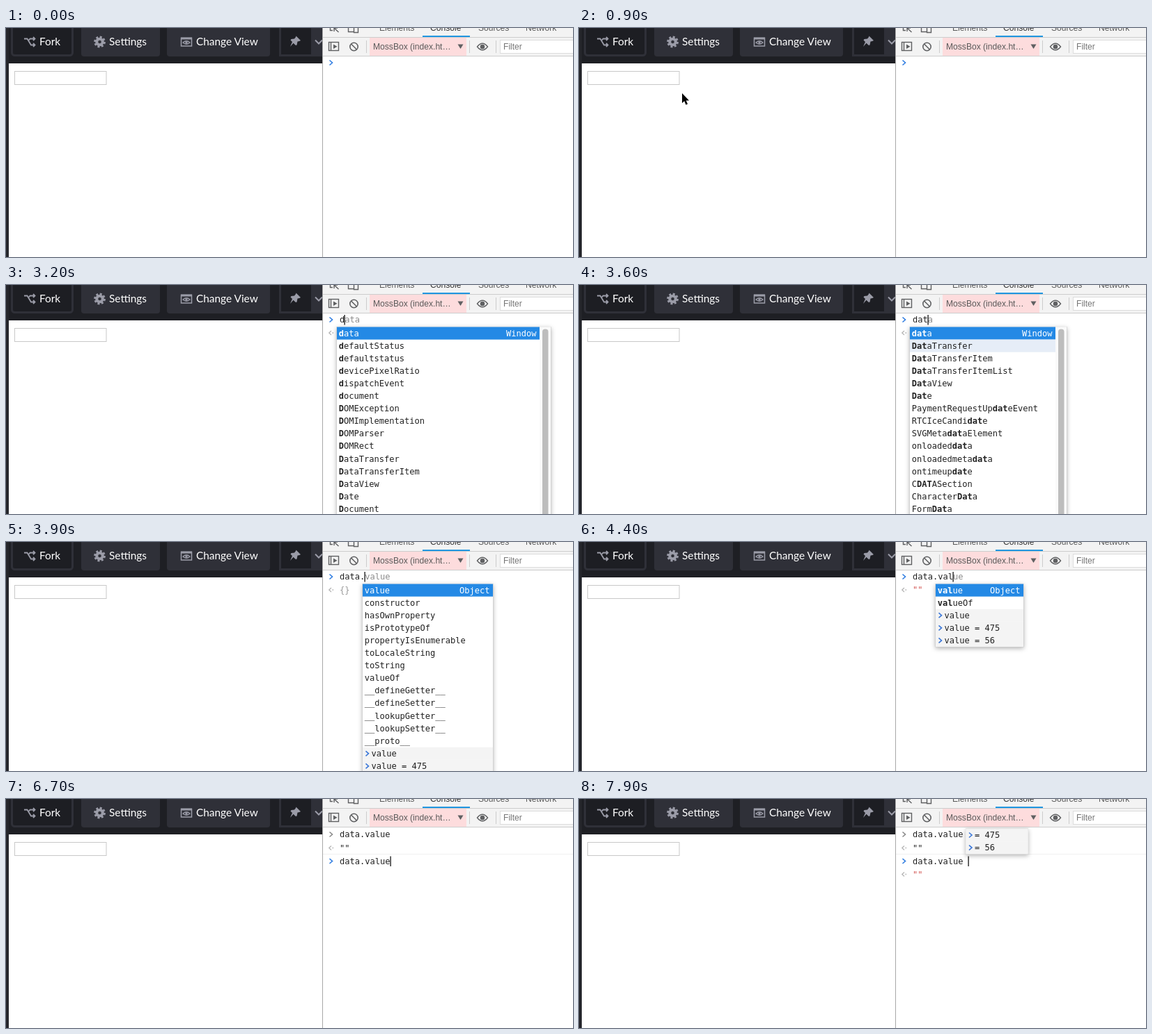
Animation, 814 px wide and 330 px high, one loop 8 s. Source, as an HTML page:

```html
<!DOCTYPE html>
<html lang="en">
<head>
<meta charset="utf-8">
<title>Console session</title>
<style>
  html, body { margin: 0; width: 100%; height: 100%; overflow: hidden; background: #fff; }
  svg { display: block; width: 814px; height: 330px; }
  text { white-space: pre; }
  .nav { font: 15.4px Lato, sans-serif; fill: #fff; }
  .ui { font: 12.1px "Liberation Sans", Arial, sans-serif; fill: #5a5a5a; }
  .mono { font: 12.05px "DejaVu Sans Mono", Menlo, monospace; fill: #222; }
  .bold { font-weight: bold; }
  .line { fill: none; stroke: #5f6062; stroke-width: 1.4; }
  .icon { fill: none; stroke: #9b9ca8; stroke-width: 1.8; }
  .popup { filter: drop-shadow(0 2px 3px rgba(0, 0, 0, .3)); }
</style>
</head>
<body>
<svg viewBox="0 0 814 330">
  <rect width="814" height="330" fill="#fff"/>

  <!-- editor header -->
  <rect width="454" height="51" fill="#1e1f24"/>
  <rect width="4" height="330" fill="#25262b"/>
  <rect x="8.5" y="-8" width="87" height="47.500" rx="4" fill="#1d1e23" stroke="#2f3038" stroke-width="3"/>
  <rect x="108" y="-8" width="113" height="49" rx="4" fill="#2f3038"/>
  <rect x="231" y="-8" width="148" height="49" rx="4" fill="#2f3038"/>
  <path d="M454 -8H393.500V39.500H454" fill="#1d1e23" stroke="#2f3038" stroke-width="3"/>
  <rect x="438" y="0" width="16" height="41" fill="#2f3038"/>
  <text class="nav" x="48" y="25">Fork</text>
  <text class="nav" x="148" y="25">Settings</text>
  <text class="nav" x="273" y="25">Change View</text>
  <g class="icon">
    <path d="M26 15.500H30.500L36 24.500H41M33 17.500L34.500 15.500H41M39 13L41.500 15.500 39 18M39 22L41.500 24.500 39 27"/>
    <circle cx="134.500" cy="20" r="4.300" stroke-width="4"/>
    <circle cx="134.500" cy="20" r="6.900" stroke-width="3" stroke-dasharray="2.900 2.520"/>
    <rect x="251.500" y="14.500" width="15" height="11.500" stroke-width="1.500"/>
    <path d="M251 15H267" stroke-width="3"/>
    <path d="M254 21Q259 16.500 264 21Q259 25.500 254 21Z" stroke-width="1.200"/>
    <circle cx="259" cy="21" r="1" stroke-width="1.500"/>
    <path d="M444 17.500L449 22.500 454 17.500" stroke-width="2"/>
  </g>
  <path d="M416.500 11.500L423 18 421 19 418.500 19.500 417.500 24.500 416 25 412.500 21.800 408 27 411 20 408.500 17.500 409.500 16 414 15.500 416 13Z" fill="#9b9ca8"/>
  <rect x="12.500" y="62.500" width="131.500" height="19" fill="#fff" stroke="#c8c8c8"/>

  <!-- developer tools -->
  <rect x="455" width="359" height="40" fill="#f3f3f3"/>
  <path d="M454.500 0V330" stroke="#a8a8a8"/>
  <path d="M455 13.500H814M455 40.500H814" stroke="#cdcdcd"/>
  <rect x="598" y="11" width="68" height="2" fill="#2196e0"/>
  <g class="ui">
    <text x="536" y="3.500">Elements</text>
    <text x="609" y="3.500" style="fill:#333">Console</text>
    <text x="678" y="3.500">Sources</text>
    <text x="746" y="3.500">Network</text>
  </g>
  <g class="line">
    <path d="M465.500 0V3.500H469M471 0L477.500 6M471 5V0H476"/>
    <path d="M491.500 0V5.500H499M499.500 0V6.500H505.500V0"/>
    <rect x="463.500" y="20.500" width="14" height="12"/>
    <path d="M466.500 20V33"/>
    <circle cx="499.500" cy="27" r="5.700" stroke-width="1.600"/>
    <path d="M495.500 23L503.500 31" stroke-width="1.600"/>
    <path d="M676.500 27Q684 17.500 691.500 27Q684 36.500 676.500 27Z"/>
  </g>
  <path d="M470 23.500L475.500 26.700 470 30Z" fill="#5f6062"/>
  <circle cx="684" cy="27" r="3.300" fill="#5f6062"/>
  <path d="M517.500 18V36M665.500 18V36M703.500 18V36" stroke="#ccc"/>
  <rect x="522" y="14" width="139" height="26" fill="#fddcdd"/>
  <text class="ui" x="527" y="31">MossBox (index.ht…</text>
  <path d="M648.500 23.500H656.500L652.500 30Z" fill="#5f6062"/>
  <rect x="709.500" y="17.500" width="110" height="19" fill="#fff" stroke="#ddd"/>
  <text class="ui" x="714" y="31" style="fill:#767676">Filter</text>

  <g id="console"></g>
  <g id="arrow"><path d="M0 0V14.200L3.200 11.300 5.500 16.700 8 15.600 5.700 10.400H10Z" fill="#000" stroke="#fff" stroke-width="1" paint-order="stroke"/></g>
  <path id="beam" d="M-2.500 -8Q0 -8 0 -6V6Q0 8 -2.500 8M2.500 -8Q0 -8 0 -6V6Q0 8 2.500 8" fill="none" stroke="#222"/>
</svg>
<script>
const LOOP = 8000, CHAR = 7.254, ROW = 18.1, LEFT = 479;
const $ = id => document.getElementById(id);

const globals = ("data DataTransfer DataTransferItem DataTransferItemList DataView Date " +
  "PaymentRequestUpdateEvent RTCIceCandidate SVGMetadataElement onloadeddata onloadedmetadata " +
  "ontimeupdate CDATASection CharacterData FormData HTMLDataElement").split(" ");
const broad = ("data defaultStatus defaultstatus devicePixelRatio dispatchEvent document DOMException " +
  "DOMImplementation DOMParser DOMRect DataTransfer DataTransferItem DataView Date Document").split(" ");
const members = ("value constructor hasOwnProperty isPrototypeOf propertyIsEnumerable toLocaleString " +
  "toString valueOf __defineGetter__ __defineSetter__ __lookupGetter__ __lookupSetter__ __proto__ " +
  ">value").split(" ").concat(">value = 475");
const values = ["value", "valueOf", ">value", ">value = 475", ">value = 56"];

// Completion lists; a leading ">" marks a history entry.
const popups = {
  wide: { x: 475, y: 60.500, w: 307, items: broad, tag: "Window", scroll: true },
  all: { x: 475, y: 60.500, w: 225, items: globals, tag: "Window", scroll: true, hover: 1 },
  data: { x: 475, y: 60.500, w: 225, items: globals.filter(s => /data/i.test(s)), tag: "Window", scroll: true },
  members: { x: 512, y: 60.500, w: 187, items: members, tag: "Object" },
  values: { x: 512, y: 60.500, w: 126, items: values, tag: "Object" },
  recent: { x: 555.500, y: 43, w: 89, items: [">= 475", ">= 56"] }
};

// time, typed, ghost, caret, popup, match, preview, committed
const steps = [
  [0, "", "", 0],
  [2700, "", "", 1],
  [3100, "d", "", 1],
  [3200, "d", "ata", 1, "wide", "d", " "],
  [3300, "da", "ta", 1, "all", "da", " "],
  [3600, "dat", "a", 1, "all", "dat", " "],
  [3700, "data", "", 1, "data", "data", "{}"],
  [3800, "data.", "", 1, "", "", "{}"],
  [3900, "data.", "value", 1, "members", "", "{}"],
  [4000, "data.v", "alue", 1, "values", "v", '""'],
  [4200, "data.va", "lue", 1, "values", "va", '""'],
  [4400, "data.val", "ue", 1, "values", "val", '""'],
  [4500, "data.valu", "e", 1, "values", "valu", '""'],
  [4700, "data.value", "", 1, "values", "value", '""'],
  [5300, "data.value", "", 0, "", "", '""'],
  [5700, "", "", 1, "", "", "", 1],
  [6200, "", "", 0, "", "", "", 1],
  [6700, "data.value", "", 1, "", "", "", 1],
  [6800, "data.value", "", 1, "", "", '""', 1],
  [7200, "data.value", "", 0, "", "", '""', 1],
  [7800, "data.value ", "", 1, "", "", '""', 1],
  [7900, "data.value ", "", 1, "recent", "", '""', 1]
];

// time, x, y, text beam
const path = [
  [400, 149, 19], [500, 313, 165], [700, 268, 143], [800, 181, 106], [900, 148, 94],
  [1100, 133, 86], [1200, 114, 75, 1], [1300, 118, 76, 1], [1400, 150, 88], [1500, 222, 103],
  [1600, 318, 108], [1700, 410, 108], [1800, 470, 105], [1900, 489, 102], [2000, 490, 101],
  [2400, 504, 96], [2500, 507, 98], [3100]
];

const at = (list, t) => list.filter(s => s[0] <= t).pop();
const rect = (x, y, w, h, fill) => `<rect x="${x}" y="${y}" width="${w}" height="${h}" fill="${fill}"/>`;
const mono = (x, y, s, fill = "#222", more = "") =>
  `<text class="mono" x="${x}" y="${y}" style="fill:${fill}" ${more}>${s}</text>`;
const stroke = (d, color, width = 1.6) => `<path d="${d}" fill="none" stroke="${color}" stroke-width="${width}"/>`;
const chevron = (x, y, color) => stroke(`M${x} ${y - 3.5}l4 3.500 -4 3.500`, color);
const result = y => stroke(`M467 ${y - 3}l-3.200 3 3.200 3`, "#b5b5b5", 1.3) + rect(468.5, y - .8, 1.6, 1.6, "#b5b5b5");

function popup({ x, y, w, items, tag, scroll, hover }, match) {
  const h = items.length * ROW, inner = scroll ? w - 16 : w;
  const rows = items.map((item, i) => {
    const top = y + i * ROW, base = top + 13, old = item[0] === ">", on = tag && i === 0;
    const fill = on ? "#2489e5" : i === hover ? "#e6edf7" : old ? "#f4f4f4" : "";
    const back = fill ? rect(x, top, inner, ROW, fill) : "";
    if (old) return back + chevron(x + 4.5, top + 9, "#3c78d8") + mono(x + 12.5, base, item.slice(1));
    const label = match ? item.replace(RegExp(match, "i"), '<tspan class="bold">$&</tspan>') : item;
    const color = on ? "#fff" : "#222";
    return back + mono(x + 2.7, base, label, color) +
      (on ? mono(x + inner - 4.5, base, tag, color, 'text-anchor="end"') : "");
  });
  const bar = scroll ? rect(x + inner, y, 16, h, "#fafafa") +
    `<rect x="${x + inner + 4}" y="${y + 3}" width="8.500" height="${h}" rx="4" fill="#bdbdbd"/>` : "";
  return `<g class="popup">${rect(x - .5, y - .5, w + 1, h + 1, "#ccc")}${rect(x, y, w, h, "#fff")}</g>` +
    rows.join("") + bar;
}

function draw([, typed, ghost, caret, list, match, preview, done]) {
  const y = done ? 89.5 : 50, end = LEFT + typed.length * CHAR;
  let out = "";
  if (done) {
    out += chevron(464.5, 51, "#8a8a8a") + mono(LEFT, 55.3, "data.value") +
      result(70.5) + mono(LEFT, 74.5, '""') + rect(455, 79, 359, 1, "#f0f0f0");
  }
  out += chevron(464.5, y, "#2f7de1") + mono(LEFT, y + 4.3, typed) + mono(end, y + 4.3, ghost, "#8c8c8c");
  if (preview) out += result(y + 19) + mono(LEFT, y + 23.3, preview, preview === "{}" ? "#777" : "#c41a16", 'opacity=".75"');
  if (caret) out += rect(Math.round(end) - .5, y - 7, 1.2, 14.5, "#000");
  if (list) out += popup(popups[list], match);
  $("console").innerHTML = out;
}

function place(node, spot, show) {
  node.style.display = show ? "" : "none";
  if (show) node.setAttribute("transform", `translate(${spot[1]} ${spot[2]})`);
}

let shown;
const start = performance.now();
function tick() {
  const t = (performance.now() - start) % LOOP;
  const step = at(steps, t), spot = at(path, t);
  if (step !== shown) draw(shown = step);
  const visible = spot && spot.length > 1;
  place($("arrow"), spot, visible && !spot[3]);
  place($("beam"), spot, visible && spot[3]);
  requestAnimationFrame(tick);
}
tick();
</script>
</body>
</html>
```
